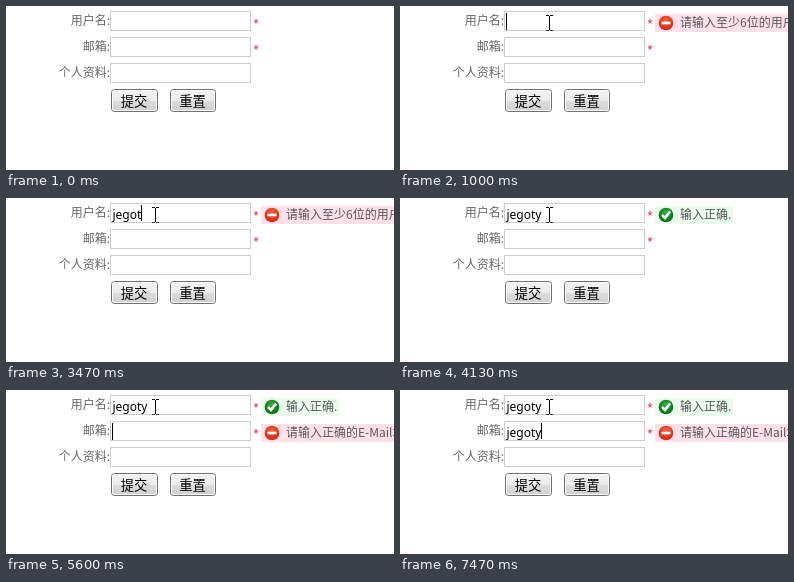
An HTML page that plays this animation: 388 by 164 pixels, repeating every 8 s.

```html
<!DOCTYPE html>
<html lang="zh-CN">
<head>
<meta charset="utf-8">
<style>
  html, body { margin: 0; width: 100%; height: 100%; overflow: hidden; background: #fff; }
  svg { display: block; width: 100vw; height: 100vh; background: #fff; }
  text { font: 12px "Noto Sans CJK SC", "Noto Sans CJK", sans-serif; fill: #666; white-space: pre; }
  .label { text-anchor: end; }
  .field { fill: #fff; stroke: #ccc; }
  .star { font: 13px "Liberation Sans", sans-serif; fill: #f0123c; }
  .typed { font: 12px "Noto Sans", sans-serif; fill: #000; }
  .note { fill: #585858; }
  .button { font-size: 13.3px; fill: #000; text-anchor: middle; }
  #beam { stroke: #fff; mix-blend-mode: difference; shape-rendering: crispEdges; }
</style>
</head>
<body>
<svg viewBox="0 0 388 164">
  <defs>
    <linearGradient id="face" x2="0" y2="1">
      <stop offset="0" stop-color="#f2f2f2"/><stop offset=".5" stop-color="#ebebeb"/>
      <stop offset=".5" stop-color="#ddd"/><stop offset="1" stop-color="#cfcfcf"/>
    </linearGradient>
    <radialGradient id="red" cy=".35"><stop stop-color="#f8673c"/><stop offset="1" stop-color="#d8301a"/></radialGradient>
    <radialGradient id="green" cy=".35"><stop stop-color="#3fb43f"/><stop offset="1" stop-color="#0b7a16"/></radialGradient>
  </defs>
  <g id="form"></g>
  <g id="arrow">
    <path d="M.5 .5V16.5L4.2 13L6.6 18.5L9 17.5L6.6 12H11.5Z" fill="#fff" stroke="#000"/>
  </g>
  <path id="beam" d="M-3 -7.5H0M1 -7.5H4M.5 -7V7M-3 7.5H0M1 7.5H4"/>
</svg>
<script>
const LOOP = 8000;
const USER = "jegoty";
const TEXT_X = 106.5;
const $ = id => document.getElementById(id);

// Each step: [time, characters typed, caret visible]
const rows = [
  { label: "用户名:", star: true, error: "请输入至少6位的用户名", doneAt: 3670, steps: [
    [1000, 0, 1], [1530, 0, 0], [1930, 1, 1], [2470, 2, 1], [2930, 2, 0],
    [3200, 3, 1], [3400, 4, 1], [3470, 5, 1], [3670, 6, 1], [4130, 6, 0]] },
  { label: "邮箱:", star: true, error: "请输入正确的E-Mail地址", doneAt: Infinity, steps: [
    [4530, 0, 1], [5070, 0, 0], [5600, 0, 1], [6000, 1, 1], [6270, 2, 1],
    [6800, 2, 0], [7070, 3, 1], [7330, 5, 1], [7470, 6, 1]] },
  { label: "个人资料:", steps: [] }
];

const message = (name, width, back, color, mark, text) => `
  <g class="${name}">
    <rect x="255" y="8" width="${width}" height="18" fill="${back}"/>
    <circle cx="266" cy="17" r="7.3" fill="url(#${color})"/>
    <path d="${mark}" fill="none" stroke="#fff" stroke-width="2.6"/>
    <text class="note" x="280" y="21">${text}</text>
  </g>`;

const rowMarkup = (row, i) => `
  <g id="row${i}" transform="translate(0 ${i * 26})">
    <text class="label" x="104" y="19">${row.label}</text>
    <rect class="field" x="104.5" y="5.5" width="140" height="19"/>
    ${row.star ? '<text class="star" x="247.5" y="22">*</text>' : ""}
    <text class="typed" x="${TEXT_X}" y="21"></text>
    <rect class="caret" y="7" width="1"/>
    ${row.error ? message("error", 140, "#ffe0e9", "red", "M261.5 17H270.5", row.error) +
      message("correct", 78, "#e9fbeb", "green", "M262 17L265 20L270 13.5", "输入正确.") : ""}
  </g>`;

const button = (x, width, text) => `
  <rect x="${x + .5}" y="83.5" width="${width}" height="22" rx="3" fill="url(#face)" stroke="#707070"/>
  <rect x="${x + 1.5}" y="84.5" width="${width - 2}" height="20" rx="2" fill="none" stroke="#fcfcfc"/>
  <text class="button" x="${x + width / 2}" y="100">${text}</text>`;

$("form").innerHTML = rows.map(rowMarkup).join("") + button(105, 46, "提交") + button(164, 45, "重置");

const show = (node, visible) => { if (node) node.style.display = visible ? "" : "none"; };

function drawRow(row, i, t) {
  const part = name => $("row" + i).querySelector("." + name);
  const step = row.steps.findLast(([time]) => time <= t);
  const [, count, caretOn] = step || [0, 0, 0];
  const typed = part("typed"), caret = part("caret");
  typed.textContent = USER.slice(0, count);
  caret.setAttribute("x", count ? Math.round(TEXT_X + typed.getComputedTextLength()) : 106);
  caret.setAttribute("height", count ? 16 : 17);
  show(caret, caretOn);
  show(part("error"), step && t < row.doneAt);
  show(part("correct"), step && t >= row.doneAt);
}

// The pointer jumps in five even steps from beside the buttons into the first field.
function drawPointer(t) {
  const p = Math.min(4, Math.floor((t - 270) / 65)) / 4;
  const x = Math.round(217 - 68 * p), y = Math.round(83 - 66 * p);
  const overField = y < 78 && (y - 5) % 26 < 20;
  for (const id of ["arrow", "beam"]) {
    $(id).setAttribute("transform", `translate(${x} ${y})`);
    show($(id), t >= 270 && overField === (id === "beam"));
  }
}

const start = performance.now();
function frame() {
  const t = (performance.now() - start) % LOOP;
  rows.forEach((row, i) => drawRow(row, i, t));
  drawPointer(t);
  requestAnimationFrame(frame);
}
frame();
</script>
</body>
</html>
```
